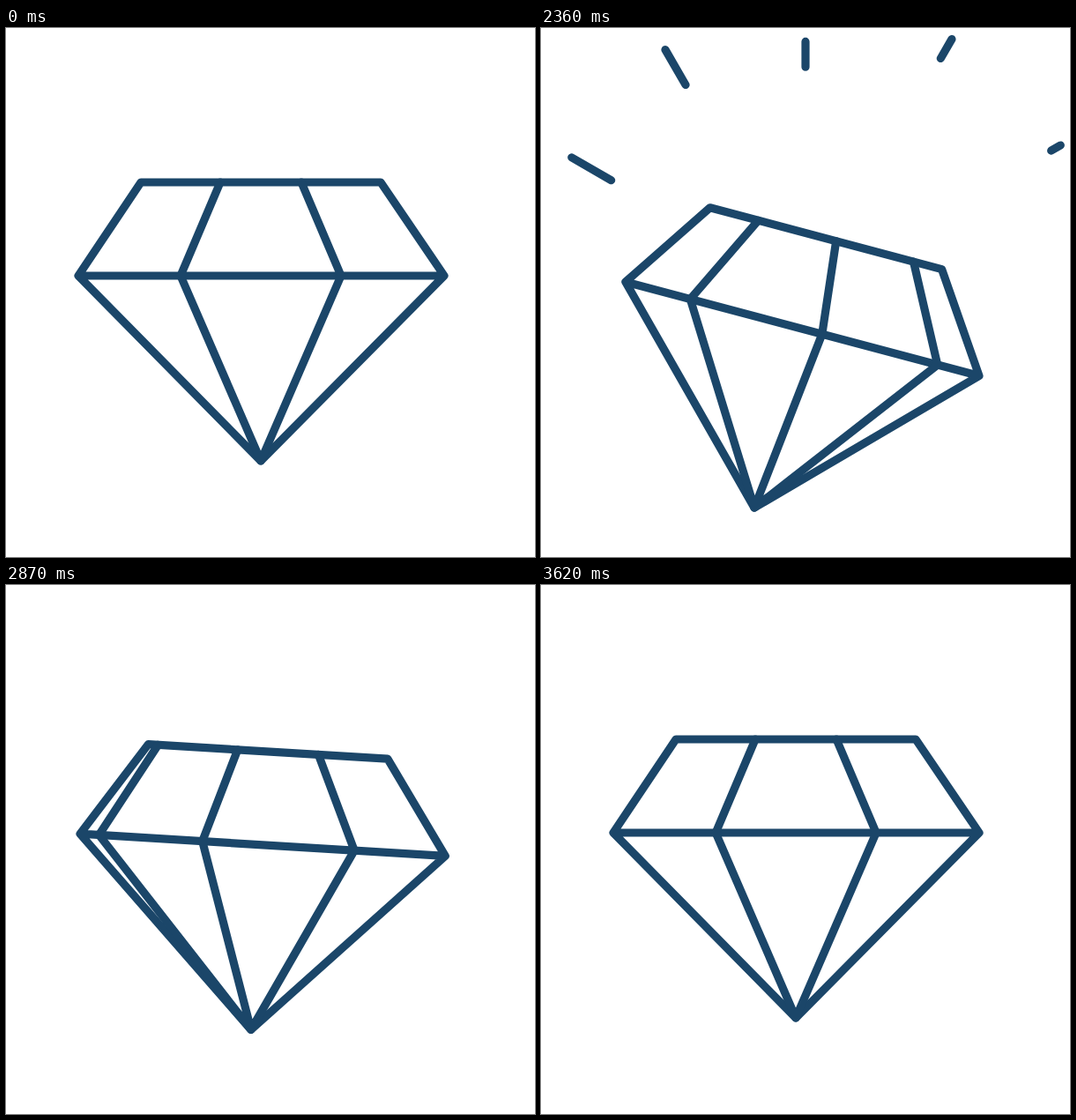
Recreate the animation shown at these times as an HTML page. Size 600 by 600 pixels, loop 3650 ms.

```html
<!DOCTYPE html>
<html>
<head>
<meta charset="utf-8">
<title>Diamond</title>
<style>
html, body { margin: 0; width: 100%; height: 100%; overflow: hidden; background: #fff; }
svg { display: block; width: 100vw; height: 100vh; }
path { fill: none; stroke: #1b4669; stroke-width: 9.2; stroke-linecap: round; stroke-linejoin: round; }
</style>
</head>
<body>
<svg viewBox="0 0 600 600">
  <g id="gem">
    <path d="M153 175H425L497 281L289 491L82 281ZM82 281H497"/>
    <path id="facets"/>
  </g>
  <path id="rays"/>
</svg>
<script>
const LOOP = 3650, START = 2030, STEP = 30, LEAD = 2000;
const gem = document.getElementById('gem');
const facets = document.getElementById('facets');
const rays = document.getElementById('rays');

const clamp = x => Math.max(0, Math.min(1, x));
const mix = (a, b, k) => a + (b - a) * k;
const smooth = x => { x = clamp(x); return x * x * (3 - 2 * x); };

// Easing with control points (x1, 0) and (x2, 1)
function ease(x, x1, x2) {
  x = clamp(x);
  let lo = 0, hi = 1;
  for (let i = 0; i < 30; i++) {
    const m = (lo + hi) / 2, n = 1 - m;
    if (3 * n * n * m * x1 + 3 * n * m * m * x2 + m * m * m < x) lo = m; else hi = m;
  }
  return lo * lo * (3 - 2 * lo);
}

// Facet edge stops: position, x on the table, x on the girdle
const stops = [
  [0, 153, 82], [0.08, 160, 98.5], [1, 243, 198],
  [2, 335, 380], [2.92, 418, 479.5], [3, 425, 497]
];

function facetPath(s) {
  let i = 1;
  while (i < stops.length - 1 && s > stops[i][0]) i++;
  const a = stops[i - 1], b = stops[i], k = (s - a[0]) / (b[0] - a[0]);
  const top = mix(a[1], b[1], k), girdle = mix(a[2], b[2], k);
  return `M${top.toFixed(2)} 175L${girdle.toFixed(2)} 281L289 491`;
}

function drawGem(u) {
  const tilt = u < 380 ? smooth(u / 380) : 1 - ease((u - 380) / 1270, 0.17, 0.06);
  gem.setAttribute('transform',
    `translate(${-6.5 * tilt} ${59 * tilt}) rotate(${15 * tilt} 289.5 333)`);

  const spin = 4 * ease(u / 1650, 0.5, 0.3) % 1;
  let d = '';
  for (let k = 1; k < 4; k++) {
    const s = k - spin;
    if (s > 0.01 && s < 2.99) d += facetPath(s);
  }
  facets.setAttribute('d', d);
}

// Rays: angle, inner and outer radius, fired from right to left
const beams = [[30, 194, 334], [60, 193, 332], [90, 181, 288], [120, 193, 332], [150, 194, 334]];

function drawRays(u) {
  let d = '';
  beams.forEach(([deg, r0, r1], i) => {
    const v = u - 30 * i;
    if (v <= 0 || v >= 435) return;
    const a = deg * Math.PI / 180;
    const at = k => {
      const r = mix(r0, r1, k);
      return `${(300 + r * Math.cos(a)).toFixed(2)} ${(300 - r * Math.sin(a)).toFixed(2)}`;
    };
    d += `M${at(smooth((v - 90) / 330))}L${at(smooth(v / 336))}`;
  });
  rays.setAttribute('d', d);
}

function draw(ms) {
  const t = ms % LOOP;
  const u = t < START ? 0 : START - LEAD + Math.floor((t - START) / STEP) * STEP;
  drawGem(u);
  drawRays(u);
}

const t0 = performance.now();
function tick() {
  draw(performance.now() - t0);
  requestAnimationFrame(tick);
}
tick();
</script>
</body>
</html>
```
